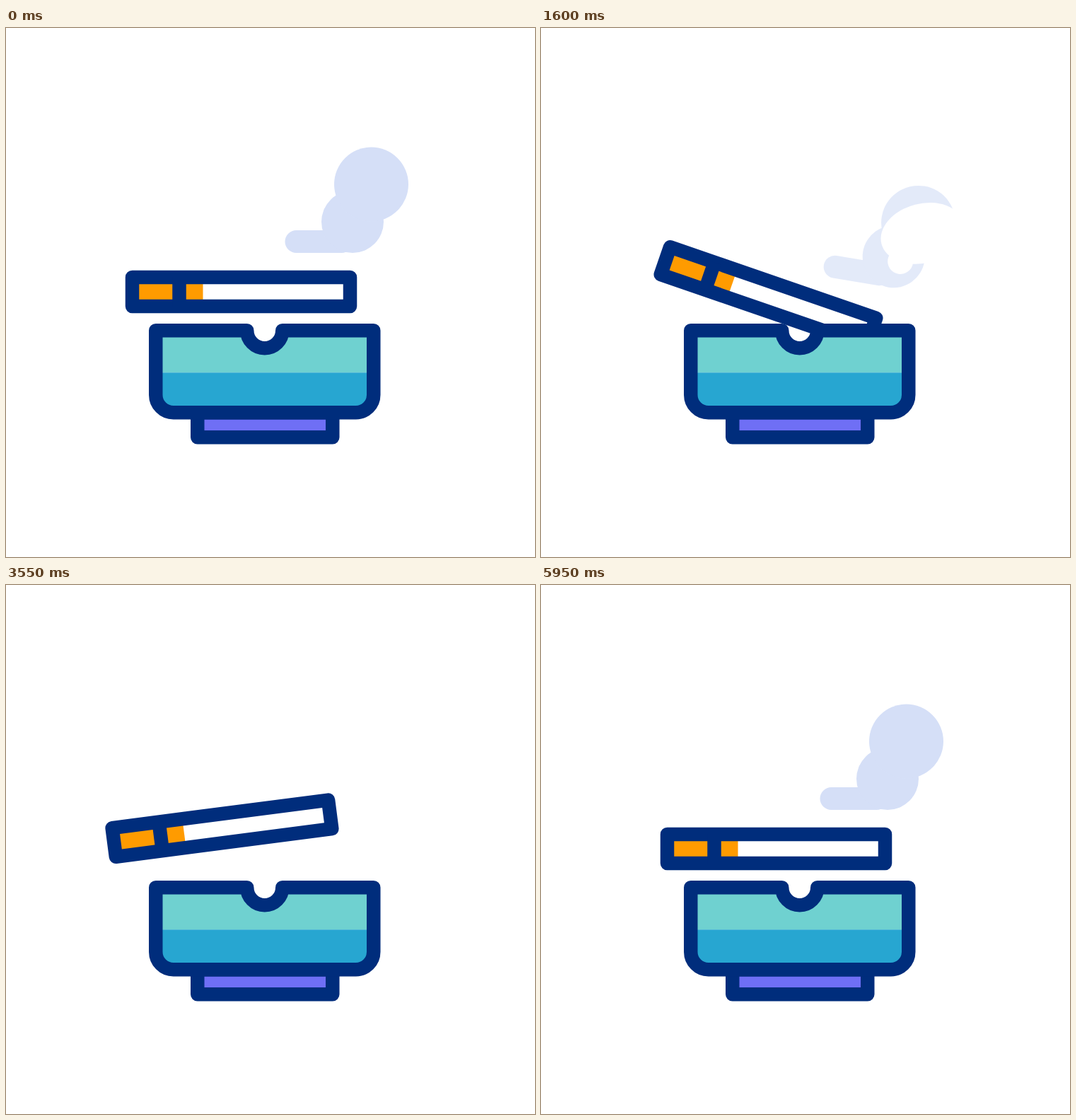
These frames come from a looping animation (748 px wide and 748 px high, 6000 ms). An HTML page:

```html
<!DOCTYPE html>
<html lang="en">
<head>
<meta charset="utf-8">
<title>Ashtray</title>
<style>
  html, body { margin: 0; width: 100%; height: 100%; overflow: hidden; background: #fff; }
  svg { display: block; width: 100%; height: 100%; }
  .line { fill: none; stroke: #002d7c; stroke-width: 19.5; stroke-linejoin: round; }
</style>
</head>
<body>
<svg viewBox="0 0 748 748">
  <defs>
    <path id="bowl" d="M211.5 427.5H340.5A25 25 0 0 0 390.5 427.5H519.5V518.5A25 25 0 0 1 494.5 543.5H236.5A25 25 0 0 1 211.5 518.5Z"/>
    <clipPath id="inside"><use href="#bowl"/></clipPath>
  </defs>

  <!-- centred on the end of its tail -->
  <g id="smoke" fill="#d5dff7">
    <rect x="-16" y="-16" width="96" height="32" rx="16"/>
    <circle cx="79.5" cy="-28" r="44"/>
    <circle cx="106" cy="-81" r="52.5"/>
    <g id="gap" fill="#fff">
      <ellipse cx="11" cy="-14" rx="60" ry="42" transform="rotate(-24)"/>
      <circle cx="-20" cy="27" r="18"/>
    </g>
  </g>

  <!-- centred on its own middle -->
  <g id="cigarette">
    <rect x="-154" y="-20.5" width="308" height="41" fill="#fff"/>
    <path d="M-154-20.5h100v41h-100z" fill="#ff9b00"/>
    <rect class="line" x="-154" y="-20.5" width="308" height="41"/>
    <path class="line" d="M-87.5-20.5v41"/>
  </g>

  <g transform="translate(.25 .25)">
    <path d="M270.5 543.5H461.5V578.5H270.5Z" fill="#6f6ff5"/>
    <path class="line" d="M270.5 543.5H461.5V578.5H270.5Z"/>
    <g clip-path="url(#inside)">
      <path d="M202 418h327v69h-327z" fill="#6fd1d0"/>
      <path d="M202 487h327v66h-327z" fill="#27a6d1"/>
    </g>
    <use href="#bowl" class="line"/>
  </g>
</svg>
<script>
const CYCLE = 3000, STEP = 50;
const [smoke, gap, cigarette] = ["smoke", "gap", "cigarette"].map(id => document.getElementById(id));

const ramp = (t, from, to) => Math.max(0, Math.min(1, (t - from) / (to - from)));
const ease = (t, from, to) => {
  const u = ramp(t, from, to);
  return u * u * (3 - 2 * u);
};
const place = (el, x, y, angle) =>
  el.setAttribute("transform", `translate(${x} ${y}) rotate(${angle})`);

function draw(now) {
  const t = Math.floor((now % CYCLE) / STEP) * STEP;

  // Lift, tip into the notch, return
  const lift = 1 - (1 - ramp(t, 0, 700)) ** 1.5;
  const back = ease(t, 2400, 2800);
  const x = 332.5 - 30 * lift + 19 * ease(t, 1150, 1600) + 11 * back;
  const y = 373 - 32 * lift + 48.4 * ease(t, 1000, 1850) - 16.4 * back;
  const angle = -8.2 * lift + 31.1 * ease(t, 1000, 1770) - 22.9 * back;
  place(cigarette, x, y, angle);

  // The smoke tilts half as far; it breaks up and vanishes as it fades
  const alpha = 1 - ramp(t, 50, 450) + ramp(t, 1275, 1775);
  place(smoke, 410.5 + 0.27 * angle, 302 + 1.88 * angle, angle / 2);
  smoke.setAttribute("opacity", alpha < 0.6 ? 0 : alpha);
  gap.setAttribute("transform", `translate(110 -50) scale(${1 - ramp(alpha, 0.65, 0.8)})`);
}

const start = performance.now();
function tick() {
  draw(performance.now() - start);
  requestAnimationFrame(tick);
}
tick();
</script>
</body>
</html>
```
